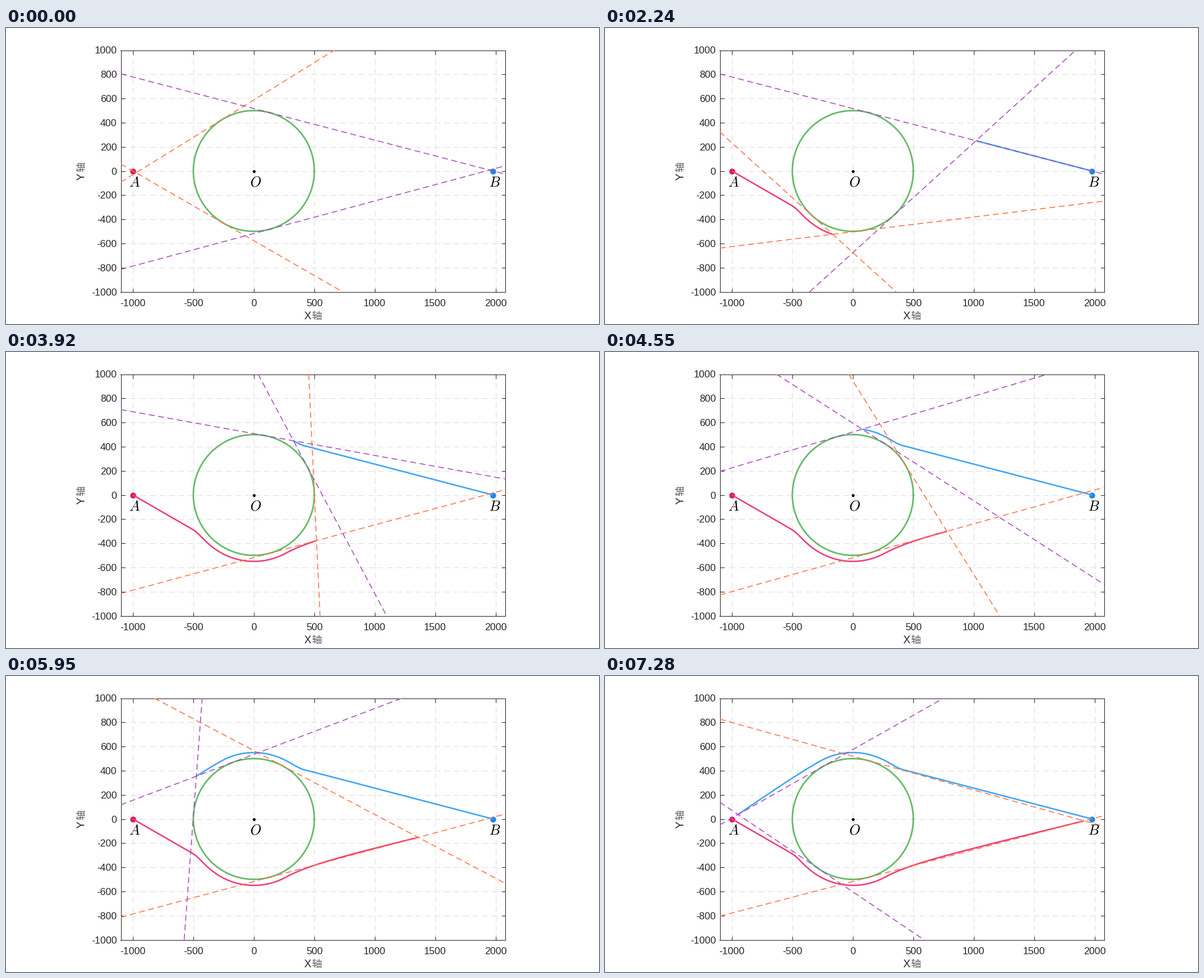
A matplotlib script that plays this animation: 1000 px wide and 500 px high, repeating every 7.35 s.

```python
import math

import matplotlib.pyplot as plt
import numpy as np
from matplotlib.animation import FuncAnimation

W, H, DPI = 1000, 500, 100
PX = 72 / DPI  # points per pixel
FRAMES, INTERVAL = 105, 70

R = 500            # obstacle radius
ORBIT = 550        # radius kept while passing the obstacle
STEP = 30
A, B = -1000 + 0j, 1976 + 0j
XMIN, XMAX, YMIN, YMAX = -1100, 2076, -1000, 1000
INK = "#262626"

plt.rcParams["font.family"] = "Liberation Sans"
plt.rcParams["mathtext.fontset"] = "cm"
plt.rcParams["axes.unicode_minus"] = False


def polar(r, angle):
    return complex(r * math.cos(angle), r * math.sin(angle))


def phase(z):
    return math.atan2(z.imag, z.real)


def tangent_angles(p):
    """Directions from p along the two tangents of the obstacle."""
    to_center = phase(-p)
    spread = math.asin(min(1, R / abs(p)))
    return to_center - spread, to_center + spread


def travel(start, goal, leave):
    """Follow a tangent, settle on the orbit, then turn towards the goal."""
    path = [start]
    heading = tangent_angles(start)[0]
    while abs(path[-1]) > 585:
        path.append(path[-1] + polar(STEP, heading))

    r, angle = abs(path[-1]), phase(path[-1]) % (2 * math.pi)
    while angle < math.radians(leave):
        new_r = ORBIT + (r - ORBIT) * math.exp(-STEP / 56)
        angle += math.sqrt(STEP**2 - (new_r - r) ** 2) / ((r + new_r) / 2)
        r = new_r
        path.append(polar(r, angle))

    heading = angle + math.pi / 2
    while len(path) < FRAMES + 1:
        turn = phase((goal - path[-1]) * polar(1, -heading))
        heading += 0.142 * turn
        path.append(path[-1] + polar(STEP, heading))
    return np.array(path)


def tangent_segment(p, angle):
    """Part of the line through p that lies inside the axes, left to right."""
    slope = math.tan(angle)
    if abs(slope) < 1e-6:
        slope = 1e-6
    cuts = sorted(p.real + (y - p.imag) / slope for y in (YMIN, YMAX))
    x = np.array([max(XMIN, cuts[0]), min(XMAX, cuts[1])])
    return x, p.imag + slope * (x - p.real)


def dashes(width):
    return (0, (10 / width, 6 / width))


fig = plt.figure(figsize=(W / DPI, H / DPI), dpi=DPI, facecolor="white")
left, right, top, bottom = 193.5, 841.5, 37.5, 445.5
ax = fig.add_axes([left / W, 1 - bottom / H, (right - left) / W, (bottom - top) / H])
ax.set_xlim(XMIN, XMAX)
ax.set_ylim(YMIN, YMAX)
ax.set_xticks(range(-1000, 2001, 500))
ax.set_yticks(range(-1000, 1001, 200))
ax.set_xticklabels([])
ax.set_yticklabels([])
ax.tick_params(direction="in", top=True, right=True, length=6.5 * PX,
               width=PX, color=INK)
ax.set_axisbelow(True)
ax.grid(color="#dedede", linewidth=PX, linestyle=dashes(1))
for spine in ax.spines.values():
    spine.set(color=INK, linewidth=PX)


def label(x, y, text, size, **kw):
    kw = {"ha": "center", "va": "center", "color": INK, **kw}
    fig.text(x / W, 1 - y / H, text, fontsize=size * PX, **kw)


scale = (right - left) / (XMAX - XMIN)
for v in range(-1000, 2001, 500):
    label(left + (v - XMIN) * scale, 470, str(v), 16.7, va="baseline")
for v in range(-1000, 1001, 200):
    label(187, 247.5 - v * scale, str(v), 16.7, ha="right", va="baseline")

cjk = {"family": "Noto Sans CJK JP", "color": "#5c5c5c"}
label(509, 487, "X", 18)
label(523.5, 487, "轴", 17, **cjk)
label(128, 251, "Y", 18, rotation=90)
label(127, 234.5, "轴", 17, rotation=90, **cjk)

for x, name in ((217, "A"), (421, "O"), (824, "B")):
    label(x, 267.5, f"${name}$", 24, va="baseline", color="black")

t = np.linspace(0, 2 * np.pi, 361)
ax.plot(R * np.cos(t), R * np.sin(t), color="#66bb6a", lw=2.7 * PX, zorder=3)
for p, color, size in ((A, "#d81b60", 10), (B, "#1e88e5", 10), (0j, "black", 5)):
    ax.plot(p.real, p.imag, "o", color=color, ms=size * PX, mew=0, zorder=4)


class Traveller:
    def __init__(self, path, color, tangent_color):
        self.path = path
        self.trail, = ax.plot([], [], color=color, lw=2.5 * PX, zorder=5,
                              solid_capstyle="butt")
        self.tangents = [
            ax.plot([], [], color=tangent_color, lw=1.5 * PX, zorder=6,
                    linestyle=dashes(1.5), dash_capstyle="butt")[0]
            for _ in range(2)
        ]

    def show(self, count):
        done = self.path[:count + 1]
        self.trail.set_data(done.real, done.imag)
        for line, angle in zip(self.tangents, tangent_angles(done[-1])):
            line.set_data(*tangent_segment(done[-1], angle))


travellers = [
    Traveller(travel(A, B, 297.5), "#ec407a", "#ff7043"),
    Traveller(travel(B, A, 118), "#42a5f5", "#ab47bc"),
]


def update(frame):
    for traveller in travellers:
        traveller.show(frame + 1)
    return []


anim = FuncAnimation(fig, update, frames=FRAMES, interval=INTERVAL,
                     repeat=True, repeat_delay=0, blit=False)
plt.show()
```
